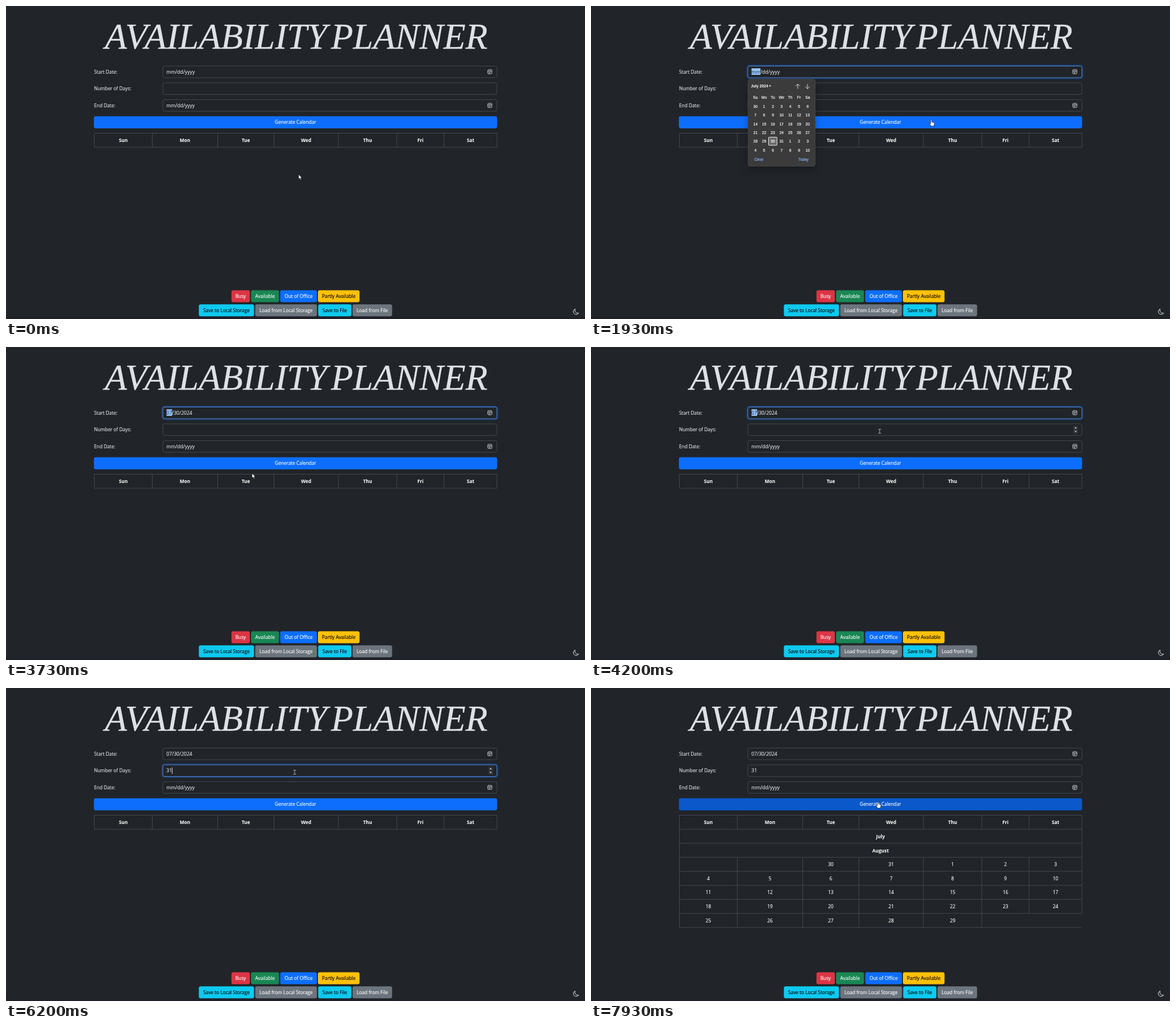
These frames come from a looping animation (1019 px wide and 550 px high, 8000 ms). An HTML page:

```html
<!DOCTYPE html>
<html lang="en">
<head>
<meta charset="utf-8">
<title>Availability Planner</title>
<style>
html, body { margin: 0; width: 100%; height: 100%; overflow: hidden; background: #212529; }
svg { position: absolute; left: 0; top: 0; display: block; }
text {
  font: 8.3px "Open Sans", sans-serif; white-space: pre;
  color: #dee2e6; fill: currentColor; stroke: currentColor; stroke-width: .14px;
}
.title { font: italic 63.6px "Liberation Serif", serif; stroke-width: .3px; }
.mid { text-anchor: middle; }
.white { color: #fff; }
.black { color: #000; }
.bold { font-weight: 700; color: #fff; stroke: none; }
.input { font-size: 8.55px; }
.small { font: 6.7px "Liberation Sans", sans-serif; color: #fff; stroke-width: .18px; }
.small.link { color: #8ab4f8; }
.small.head { font-weight: 700; stroke: none; }
#popup {
  position: absolute; left: 275.5px; top: 128px; width: 119px; height: 154px;
  box-sizing: border-box; border: 1px solid #54585c; border-radius: 4px;
  box-shadow: 0 7px 14px rgba(0, 0, 0, .27);
}
</style>
</head>
<body>
<svg id="page" width="1019" height="550" viewBox="0 0 1019 550"></svg>
<div id="popup"></div>
<svg id="over" width="1019" height="550" viewBox="0 0 1019 550"></svg>
<script>
const LOOP = 8000, STEP = 1000 / 15;
const EDGE = '#42484e';
const page = document.getElementById('page');
const over = document.getElementById('over');
const popup = document.getElementById('popup');

function add(parent, tag, attrs = {}, content) {
  const el = document.createElementNS('http://www.w3.org/2000/svg', tag);
  for (const name in attrs) el.setAttribute(name, attrs[name]);
  if (content !== undefined) el.textContent = content;
  parent.append(el);
  return el;
}
const group = parent => add(parent, 'g');
const label = (parent, x, y, str, cls = '') => add(parent, 'text', { x, y, class: cls }, str);
const box = (parent, x, y, width, height, fill, rx = 0, more = {}) =>
  add(parent, 'rect', { x, y, width, height, fill, rx, ...more });
const line = (parent, d, stroke = EDGE, width = 1) =>
  add(parent, 'path', { d, stroke, 'stroke-width': width, fill: 'none' });
const show = (el, on) => { el.style.display = on ? '' : 'none'; };
const clamp = v => Math.max(0, Math.min(1, v));

// Header and form
box(page, 0, 547, 1019, 3, '#1f2029');
const title = add(page, 'text', { y: 74.7, class: 'title' });
add(title, 'tspan', { x: 174 }, 'AVAILABILITY');
add(title, 'tspan', { x: 572 }, 'PLANNER');

function field(y, name) {
  label(page, 155, y + 13.2, name);
  const glow = box(page, 274.6, y - 1.4, 590.8, 23.3, 'none', 4.4,
    { stroke: '#0d6efd', 'stroke-width': 2 });
  const edge = box(page, 276, y, 588, 20.5, 'none', 3.2);
  return focus => {
    glow.setAttribute('stroke-opacity', focus * .3);
    const mix = (a, b) => Math.round(a + (b - a) * focus);
    edge.setAttribute('stroke', `rgb(${mix(66, 88)},${mix(72, 138)},${mix(78, 222)})`);
  };
}
function dateIcon(y) {
  box(page, 847.9, y - 3.6, 7.2, 7.2, 'none', 1.4, { stroke: '#dee2e6', 'stroke-width': .9 });
  line(page, `M848 ${y - 1.4}h7M849.6 ${y + .4}h3.8M849.6 ${y + 1.9}h2.4`, '#dee2e6', .8);
}
const focusStart = field(105.5, 'Start Date:');
const focusDays = field(135, 'Number of Days:');
field(164.5, 'End Date:')(0);
dateIcon(115.5);
dateIcon(174.7);

const mark = box(page, 282.5, 109.5, 15.5, 11.5, '#99c8ff');
const startText = label(page, 282.3, 118.8, '', 'input');
const part = add(startText, 'tspan');
const rest = add(startText, 'tspan');
label(page, 282.3, 178, 'mm/dd/yyyy', 'input');
const daysText = label(page, 282.3, 148.4, '', 'input');
const caret = box(page, 283, 139.5, .8, 11.5, '#fff');
const spinner = group(page);
box(spinner, 849, 138.5, 8, 13.5, '#31353a', 1);
add(spinner, 'path', { d: 'M851 143l2-2.4 2 2.4zM851 147.6l2 2.4 2-2.4z', fill: '#ced4da' });

const generate = box(page, 154.7, 193.7, 709.6, 21.2, '#0d6efd', 3.3);
label(page, 509.5, 207.3, 'Generate Calendar', 'mid white');

// Calendar table
const cols = [155.5, 257.5, 372.5, 471.5, 585, 687.8, 771, 864];
const rowY = n => 223.5 + n * 24.65;
const midX = c => (cols[c] + cols[c + 1]) / 2;
const textY = n => rowY(n) + 15.7;
line(page, `M155.5 ${rowY(0)}H864M155.5 ${rowY(1)}H864` +
  cols.map(x => `M${x} ${rowY(0)}V${rowY(1)}`).join(''));
['Sun', 'Mon', 'Tue', 'Wed', 'Thu', 'Fri', 'Sat'].forEach((day, c) =>
  label(page, midX(c), textY(0), day, 'mid bold'));

const days = group(page);
for (let r = 2; r <= 8; r++) line(days, `M155.5 ${rowY(r)}H864`);
cols.forEach((x, c) => {
  const top = c % 7 ? 3 : 1;
  line(days, `M${x} ${rowY(top)}V${rowY(c > 5 ? 7 : 8)}`);
});
label(days, 509.5, textY(1), 'July', 'mid bold');
label(days, 509.5, textY(2), 'August', 'mid bold');
for (let i = 0; i < 31; i++) {
  const cell = i + 2;
  label(days, midX(cell % 7), textY(3 + Math.floor(cell / 7)), (29 + i) % 31 + 1, 'mid white');
}

// Bottom buttons
function button(x, right, y, fill, str, dark) {
  box(page, x, y, right - x, 21, fill, 3.3);
  label(page, (x + right) / 2, y + 13.6, str, dark ? 'mid black' : 'mid white');
}
button(396.8, 429.2, 499.6, '#dc3545', 'Busy');
button(431.3, 480.4, 499.6, '#198754', 'Available');
button(482.6, 547.2, 499.6, '#0d6efd', 'Out of Office');
button(549, 622.2, 499.6, '#ffc107', 'Partly Available', true);
button(339.4, 436.5, 524.2, '#0dcaf0', 'Save to Local Storage', true);
button(438.6, 547.2, 524.2, '#6c757d', 'Load from Local Storage');
button(549.4, 607.8, 524.2, '#0dcaf0', 'Save to File', true);
button(609.8, 679.5, 524.2, '#6c757d', 'Load from File');
line(page, 'M1001.6 532.4a5 5 0 1 0 6.2 7.2a5.3 5.3 0 0 1-6.2-7.2z', '#dee2e6', 1);

// Date picker
const picker = group(over);
label(picker, 281.5, 143, 'July 2024', 'small head');
add(picker, 'path', { d: 'M313 139.4h4.2l-2.1 2.4z', fill: '#fff' });
line(picker, 'M363.8 145.5v-8.5m-3.8 3.8l3.8-3.8 3.8 3.8M381 137v8.5m-3.8-3.8l3.8 3.8 3.8-3.8', '#e8e8e8', .9);
const today = box(picker, 312.5, 230.5, 14.8, 14.3, '#6b6b6b', 1, { stroke: '#fff', 'stroke-width': .9 });
const pickX = c => 289.4 + c * 15.32;
['Su', 'Mo', 'Tu', 'We', 'Th', 'Fr', 'Sa'].forEach((d, c) =>
  label(picker, pickX(c), 163.2, d, 'small mid'));
for (let i = 0; i < 42; i++) {
  const n = i === 0 ? 30 : (i - 1) % 31 + 1;
  label(picker, pickX(i % 7), 178.9 + Math.floor(i / 7) * 15.36, n, 'small mid');
}
label(picker, 295.5, 272.4, 'Clear', 'small mid link');
label(picker, 374, 272.4, 'Today', 'small mid link');

// Pointer shapes, each with its hot spot at 0,0
const ink = { fill: '#fff', stroke: '#000', 'stroke-width': .6, 'stroke-linejoin': 'round' };
const pointer = group(over);
const shapes = {
  arrow: add(pointer, 'path', { d: 'M0 0V8.3L1.9 6.6 3.2 9.5 4.6 8.9 3.3 6.1H6Z', ...ink }),
  hand: add(pointer, 'path', {
    d: 'M-1.1 1Q-1-.1 0 0 .9 0 .9 1V4L4.4 4.8Q5.4 5.2 5.2 6.5L4.4 11H-.6L-3 7.4Q-3.2 6-2.2 6.3L-1.1 7.3Z', ...ink
  }),
  beam: line(pointer, 'M-2.5-3.6H-.6L0-3 .6-3.6H2.5M0-3V3M-2.5 3.6H-.6L0 3 .6 3.6H2.5', '#d5d8da', .8)
};

// Pointer track: step, x, y
const track = [
  [3, 515, 296], [7, 481, 264], [10, 560, 218], [13, 760, 130], [16, 854, 111],
  [21, 854, 111], [25, 765, 160], [29, 599, 200], [31, 488, 232], [34, 410, 257],
  [38, 380, 267], [51, 380, 267], [55, 418, 234], [59, 478, 186], [63, 508, 148],
  [106, 508, 148], [114, 505, 200]
];
function pointerAt(k) {
  let i = track.findIndex(p => p[0] > k);
  if (i < 0) return track[track.length - 1].slice(1);
  if (i === 0) return track[0].slice(1);
  const [k0, x0, y0] = track[i - 1], [k1, x1, y1] = track[i];
  const f = (k - k0) / (k1 - k0);
  return [x0 + (x1 - x0) * f, y0 + (y1 - y0) * f];
}

function draw(t) {
  const k = Math.floor(t / STEP + .1);
  const from = (a, b) => k >= a && k < b;

  const [x, y] = pointerAt(k);
  const onButton = y > 194 && y < 215 && k > 25;
  const onDays = y > 135 && y < 156 && k > 51;
  const kind = onButton ? 'hand' : onDays ? 'beam' : 'arrow';
  for (const name in shapes) show(shapes[name], name === kind);
  pointer.setAttribute('transform', `translate(${x} ${y})`);
  show(spinner, onDays);
  generate.setAttribute('fill', k >= 117 ? '#0a58ca' : onButton && k > 51 ? '#0b5ed7' : '#0d6efd');

  focusStart(clamp((k - 18) / 3) * clamp((70 - k) / 4));
  focusDays(clamp((k - 66) / 3) * clamp((119 - k) / 3));

  const picked = k >= 43, selected = from(19, 67);
  part.textContent = picked ? '07' : 'mm';
  rest.textContent = picked ? '/30/2024' : '/dd/yyyy';
  part.style.color = selected ? '#2a4360' : '';
  mark.setAttribute('width', picked ? 9.8 : 15.7);
  show(mark, selected);

  show(popup, from(20, 46));
  popup.style.background = k > 20 ? '#3b3b3b' : 'none';
  popup.style.borderColor = k > 20 ? '#434343' : '#54585c';
  show(picker, from(21, 46));
  today.setAttribute('fill', k >= 44 ? '#858585' : '#6b6b6b');

  const typed = k < 89 ? '' : k < 93 ? '3' : '31';
  daysText.textContent = typed;
  caret.setAttribute('x', 283 + typed.length * 4.6);
  show(caret, from(67, 75) || from(83, 101) || from(109, 117));
  show(days, k >= 118);
}

const began = performance.now();
function tick() {
  draw((performance.now() - began) % LOOP);
  requestAnimationFrame(tick);
}
tick();
</script>
</body>
</html>
```
